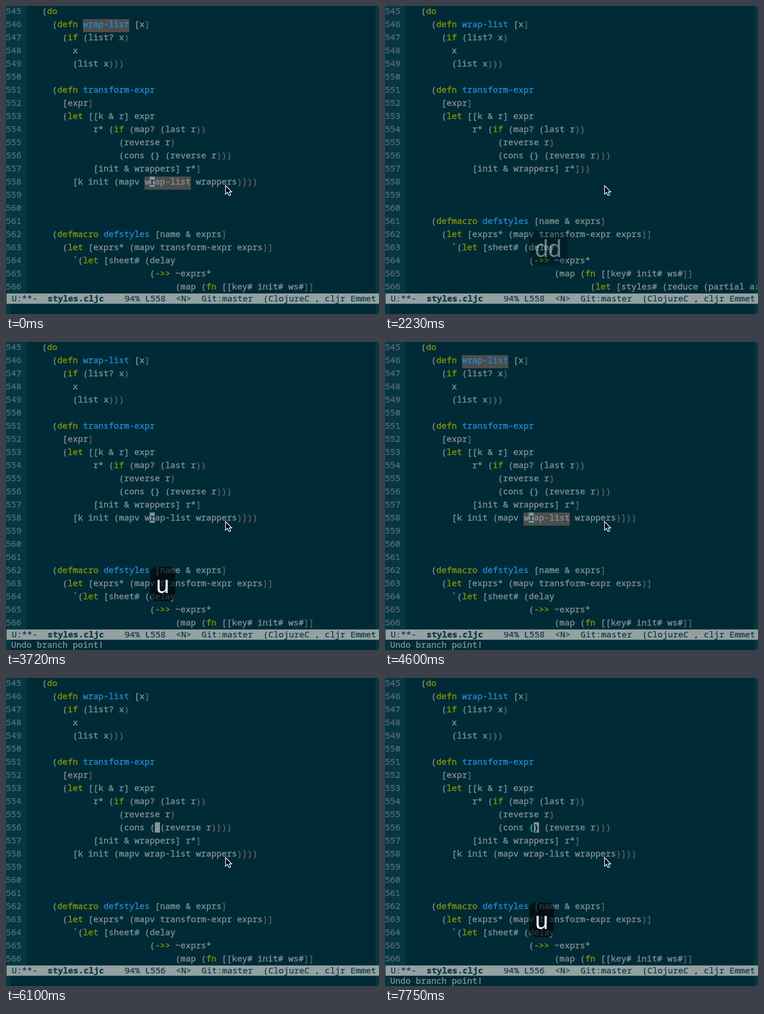
An HTML page for the animation above (8000 ms loop, 654 by 540 pixels).

```html
<!DOCTYPE html>
<html lang="en">
<head>
<meta charset="utf-8">
<title>Editing styles.cljc</title>
<style>
  html, body { margin: 0; width: 100%; height: 100%; overflow: hidden; background: #002b36; }
  svg { display: block; }
  text { font: 15px "Noto Sans Mono", monospace; color: #839496; white-space: pre; font-variant-ligatures: none; }
  text, tspan { fill: currentColor; stroke: currentColor; stroke-width: .35; }
  .num { color: #586e75; }
  .kw { color: #859900; }
  .fn { color: #268bd2; }
  .dim { color: #666; }
  .under { color: #002b36; }
  .match { color: #2aa198; }
  .bold { font-weight: 700; }
  .mode { color: #073642; stroke-width: .2; }
  .keys { font: 42px "Liberation Sans", Arial, sans-serif; color: #fff; stroke: none; }
</style>
</head>
<body>
<svg id="stage" width="654" height="540" viewBox="0 0 654 540"></svg>
<script>
const LOOP = 8000, CHAR = 9, ROW = 23, LEFT = 36, FIRST = 545;
const KEY_WIDTH = { d: 23.3, u: 23.3, k: 21, l: 9.3 };

const source = [
  '   (do',
  '     (defn wrap-list [x]',
  '       (if (list? x)',
  '         x',
  '         (list x)))',
  '',
  '     (defn transform-expr',
  '       [expr]',
  '       (let [[k & r] expr',
  '             r* (if (map? (last r))',
  '                  (reverse r)',
  '                  (cons {} (reverse r)))',
  '             [init & wrappers] r*]',
  '         [k init (mapv wrap-list wrappers)]))',
  '', '', '',
  '     (defmacro defstyles [name & exprs]',
  '       (let [exprs* (mapv transform-expr exprs)]',
  '         `(let [sheet# (delay',
  '                        (->> ~exprs*',
  '                             (map (fn [[key# init# ws#]]',
  '                                    (let [styles# (reduce (partial a'
];
const lineDeleted = source.filter((_, i) => i !== 13);
lineDeleted[12] += '))';
const braceDeleted = source.slice();
braceDeleted[11] = '                  (cons { (reverse r)}))';

// Each step changes part of the state: cursor is [row, column].
const steps = [
  [0, { lines: source, cursor: [13, 24], on: true, half: false, marked: true, match: false,
        line: 558, mode: 'N', keys: '', alpha: 1, message: '' }],
  [450, { on: false }],
  [900, { on: true }],
  [1340, { half: true, mode: 'O', keys: 'd' }],
  [1640, { lines: lineDeleted, cursor: [13, 0], half: false, marked: false, mode: 'N', keys: 'dd' }],
  [2090, { alpha: .85 }],
  [2230, { alpha: .4, on: false }],
  [2380, { keys: '' }],
  [2680, { on: true }],
  [3120, { on: false }],
  [3570, { lines: source, cursor: [13, 24], on: true, message: 'Undo branch point!' }],
  [3720, { keys: 'u', alpha: 1 }],
  [3870, { marked: true }],
  [4160, { on: false, alpha: .85 }],
  [4310, { alpha: .4 }],
  [4460, { keys: '' }],
  [4600, { on: true }],
  [4900, { cursor: [12, 24], marked: false, line: 557, keys: 'k', alpha: 1, message: '' }],
  [5200, { cursor: [11, 24], line: 556, keys: 'kk' }],
  [5350, { cursor: [11, 25], match: true, keys: 'kkl' }],
  [5950, { lines: braceDeleted, match: false, alpha: .45 }],
  [6100, { keys: '' }],
  [6550, { on: false }],
  [7000, { on: true }],
  [7600, { lines: source, message: 'Undo branch point!' }],
  [7750, { match: true, keys: 'u', alpha: 1 }]
];
let last = {};
const states = steps.map(([at, change]) => last = { ...last, ...change, at });

const escape = s => s.replace(/&/g, '&amp;').replace(/</g, '&lt;').replace(/>/g, '&gt;');
const span = (cls, s) => `<tspan class="${cls}">${escape(s)}</tspan>`;
const rect = (x, y, w, h, fill) => `<rect x="${x}" y="${y}" width="${w}" height="${h}" fill="${fill}"/>`;
const text = (x, y, inner, cls = '') => `<text x="${x}" y="${y}" class="${cls}">${inner}</text>`;
const colX = col => LEFT + col * CHAR;
const baseline = row => row * ROW + 14;

function colour(code) {
  const parts = /(\((?:do|defn|defmacro|let|if|fn|->>)(?=\s|$))|((?:wrap-list|transform-expr|defstyles)(?=$| \[))|([)\]}]+$)/g;
  let out = '', from = 0;
  for (const m of code.matchAll(parts)) {
    const defined = m[2] && /\((defn|defmacro) $/.test(code.slice(0, m.index));
    if (m[2] && !defined) continue;
    out += escape(code.slice(from, m.index));
    out += m[1] ? '(' + span('kw', m[1].slice(1)) : span(m[2] ? 'fn' : 'dim', m[0]);
    from = m.index + m[0].length;
  }
  return out + escape(code.slice(from));
}

function drawCursor({ cursor: [row, col], lines, half, match }) {
  const x = colX(col), y = row * ROW, char = lines[row][col];
  if (half) return rect(x, y + 9, CHAR, 9, '#839496');
  return rect(x, y, CHAR, char ? 18 : ROW, '#839496') +
    (char ? text(x, baseline(row), escape(char), match ? 'under bold' : 'under') : '');
}

function drawKeys({ keys, alpha }) {
  if (!keys) return '';
  const width = [...keys].reduce((sum, k) => sum + KEY_WIDTH[k], 20.5);
  return `<g opacity="${alpha}"><rect x="253" y="394" width="${width}" height="60" rx="10" fill="#000" fill-opacity=".6"/>` +
    text(263, 440, keys, 'keys') + '</g>';
}

function draw(s) {
  let out = rect(0, 0, 654, 540, '#002b36') + rect(0, 0, LEFT, 504, '#073642');
  if (s.marked) out += rect(colX(11), ROW, 81, ROW, '#4d4d4d') + rect(colX(23), 13 * ROW, 81, ROW, '#4d4d4d');
  s.lines.slice(0, 22).forEach((code, row) => {
    out += text(0, baseline(row), FIRST + row, 'num') + text(LEFT, baseline(row), colour(code));
  });
  if (s.match) out += rect(colX(24), 11 * ROW, CHAR, 18, '#002b36') + text(colX(24), baseline(11), '{', 'match bold');
  if (s.on) out += drawCursor(s);
  out += rect(648, 0, 6, 504, '#073642');
  if (s.lines === lineDeleted) out += rect(650, 490, 4, 1.5, '#586e75') + rect(650, 494, 4, 1.5, '#586e75');
  out += rect(1, 504, 653, 18, '#93a1a1') +
    text(1, 518, ' U:**-  ' + span('bold', 'styles.cljc') +
      escape(`    94% L${s.line}  <${s.mode}>  Git:master  (ClojureC , cljr Emmet`), 'mode');
  out += rect(0, 522, 9, 18, '#073642') + rect(648, 522, 6, 18, '#073642') + text(9, 536, s.message);
  out += '<path d="M385 315v15l3.5-3.2 2.6 5.7 2.7-1.2-2.6-5.5h4.6z" fill="#000" stroke="#fff" stroke-width="1.2"/>';
  return out + drawKeys(s);
}

const stage = document.getElementById('stage');
const start = performance.now();
let shown = null;
function frame() {
  const t = (performance.now() - start) % LOOP;
  const state = states.findLast(s => s.at <= t);
  if (state !== shown) {
    stage.innerHTML = draw(state);
    shown = state;
  }
  requestAnimationFrame(frame);
}
frame();
</script>
</body>
</html>
```
